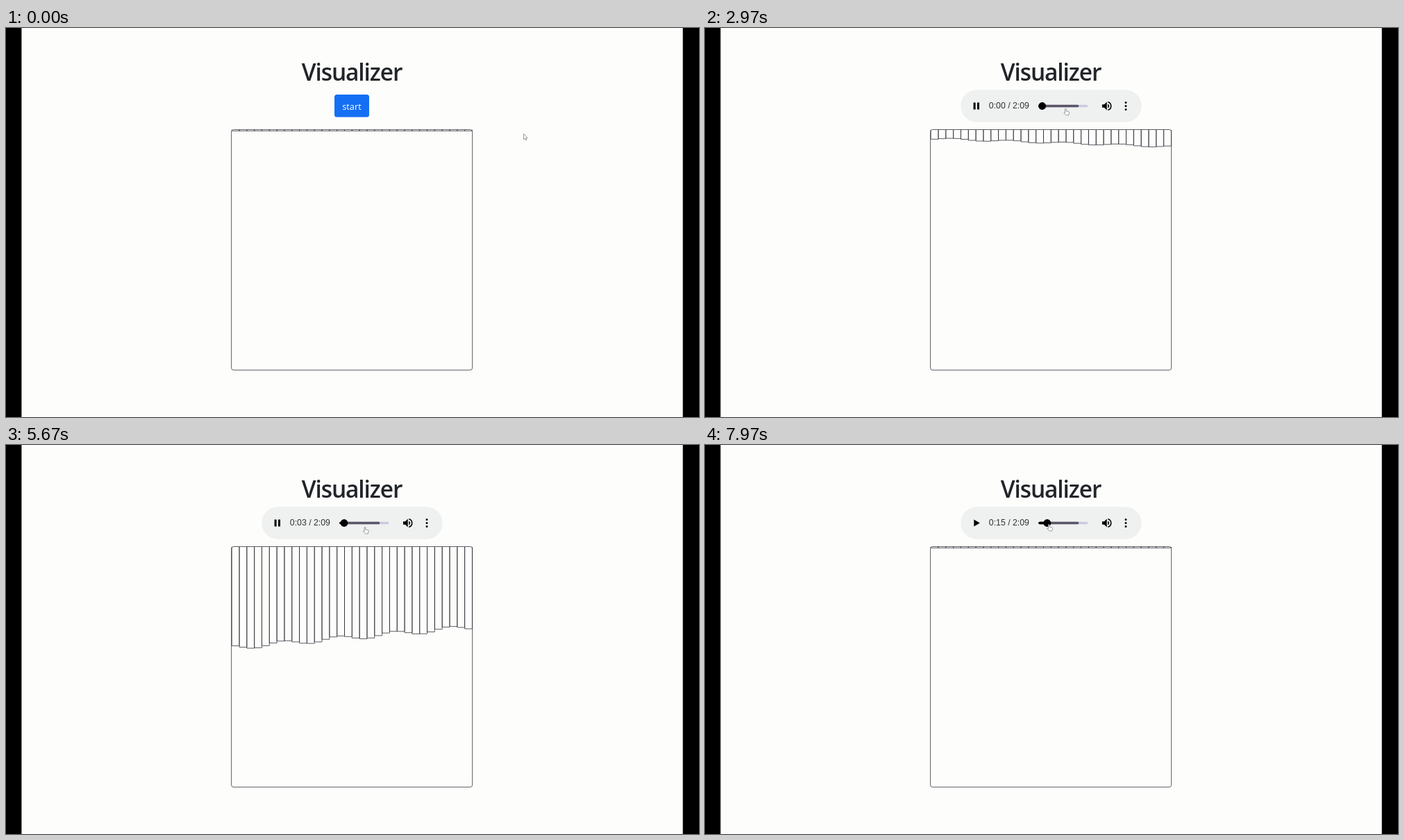
Animation of 998x561 px, one loop 8000 ms. Source, as an HTML page:

```html
<!DOCTYPE html>
<html lang="en">
<head>
<meta charset="utf-8">
<title>Visualizer</title>
<style>
  html, body { margin: 0; width: 100%; height: 100%; overflow: hidden; background: #000; }
  svg { display: block; width: 100%; height: 100%; }
  .ui { font-family: "Open Sans", "Noto Sans", sans-serif; text-anchor: middle; }
  .title { font-size: 33.5px; font-weight: 600; letter-spacing: -1.1px; fill: #212529; }
  .clock { font: 12.3px "Liberation Sans", Arial, sans-serif; fill: #333; }
  .line { fill: none; stroke: #2a2a32; stroke-width: .75; }
  .track { stroke-width: 3.6; stroke-linecap: round; }
  .pointer { fill: #fff; stroke: #80808a; stroke-width: .8; stroke-linejoin: round; }
</style>
</head>
<body>
<svg viewBox="0 0 998 561">
  <rect x="22.4" width="952.3" height="561" fill="#fdfdfc"/>
  <text class="ui title" x="498" y="76.3">Visualizer</text>

  <g id="button">
    <rect x="473" y="96" width="50" height="32.5" rx="3.5" fill="#146ff5"/>
    <text class="ui" x="498" y="117.6" font-size="12.8" fill="#fff">start</text>
  </g>

  <g id="player">
    <rect x="368.3" y="89.3" width="260.4" height="46.4" rx="23.2" fill="#eff0f0"/>
    <path id="pause" d="M386.6 107.6h3v10h-3zM392 107.6h3v10h-3z"/>
    <path id="play" d="M387.3 107.4v10.2l8.6-5.1z"/>
    <text id="clock" class="clock" x="408.8" y="116.4"></text>
    <path class="track" stroke="#cbc9e0" d="M482 112.5H549.5"/>
    <path class="track" stroke="#5a5666" d="M482 112.5H536.5"/>
    <path id="played" class="track" stroke="#000"/>
    <circle id="thumb" cy="112.5" r="5.4"/>
    <path transform="translate(569.7 103.5) scale(.75)" d="M3 9v6h4l5 5V4L7 9zM16.5 12c0-1.8-1-3.3-2.5-4v8c1.5-.7 2.5-2.2 2.5-4zM14 3.2v2.1a7 7 0 0 1 0 13.4v2.1a9 9 0 0 0 0-17.6z"/>
    <path d="M606 107.6h0M606 112.5h0M606 117.4h0" stroke="#000" stroke-width="3" stroke-linecap="round"/>
  </g>

  <rect class="line" x="324.6" y="146.5" width="347" height="346.8" rx="3"/>
  <path id="bars" class="line"/>

  <g id="cursor">
    <path id="arrow" class="pointer" d="M0 0V8.4L1.9 6.7 3.2 9.4 4.4 8.9 3.2 6.2H5.6z"/>
    <path id="hand" class="pointer" d="M1 1Q1.8-.4 2.6 1V4L6 4.8Q7.2 5 7 6.4L6 10H2.6L-.8 6.6Q-.6 5.4 1 6.4z"/>
  </g>
</svg>
<script>
const LOOP = 8000, BAR_COUNT = 32, BAR_WIDTH = 10.82;
const CLICK = 2250, AUDIO_START = 2300, SOUND = 2550, SEEK = 7720;
const $ = id => document.getElementById(id);
const show = (id, visible) => $(id).setAttribute('display', visible ? 'inline' : 'none');

// Key points: time, then values
const route = [
  [250, 745.5, 152.5], [870, 718, 144], [1430, 566.5, 117], [1850, 519, 115],
  [4670, 515.5, 117], [6300, 515, 118.5], [6930, 503, 115.5], [7600, 493.5, 114]
];
const loudness = [[2550, 10], [2970, 26], [5670, 130], [7300, 100], [7600, 50]];

function sample(points, time, column = 1) {
  const next = points.findIndex(p => p[0] >= time);
  if (next < 0) return points[points.length - 1][column];
  if (next === 0) return points[0][column];
  const a = points[next - 1], b = points[next];
  return a[column] + (b[column] - a[column]) * (time - a[0]) / (b[0] - a[0]);
}

// A fast bass tone sets the height; a tilt and a ripple run across the bars.
function barHeight(i, t) {
  if (t < SOUND || t >= SEEK) return 1.4;
  const step = Math.floor(t * .03 + .11);
  const bass = sample(loudness, t) * Math.cos((step - 170) * Math.PI * .75);
  const tilt = -(7 + .06 * bass) * (i - 16) / 16;
  const ripple = (1 + .02 * Math.abs(bass)) * Math.cos((i - 10) * .85);
  return Math.max(1.4, Math.abs(bass + tilt + ripple));
}

function draw(t) {
  const playing = t >= CLICK, seeking = t >= SEEK;
  show('button', !playing);
  show('player', playing);
  show('pause', !seeking);
  show('play', seeking);

  const elapsed = seeking ? 15 : Math.max(0, (t - AUDIO_START) / 1000);
  $('clock').textContent = `0:${String(Math.floor(elapsed)).padStart(2, '0')} / 2:09`;
  const thumbX = 485.3 + elapsed * .5;
  $('thumb').setAttribute('cx', thumbX);
  $('played').setAttribute('d', `M482 112.5H${thumbX}`);

  let path = '';
  for (let i = 0; i < BAR_COUNT; i++) {
    path += `M${325.2 + i * BAR_WIDTH} 147v${barHeight(i, t)}h${BAR_WIDTH}V147`;
  }
  $('bars').setAttribute('d', path);

  const x = sample(route, t), y = sample(route, t, 2);
  $('cursor').setAttribute('transform', `translate(${x} ${y})`);
  show('arrow', x > 523);
  show('hand', x <= 523);
}

function tick() {
  draw(performance.now() % LOOP);
  requestAnimationFrame(tick);
}
tick();
</script>
</body>
</html>
```
